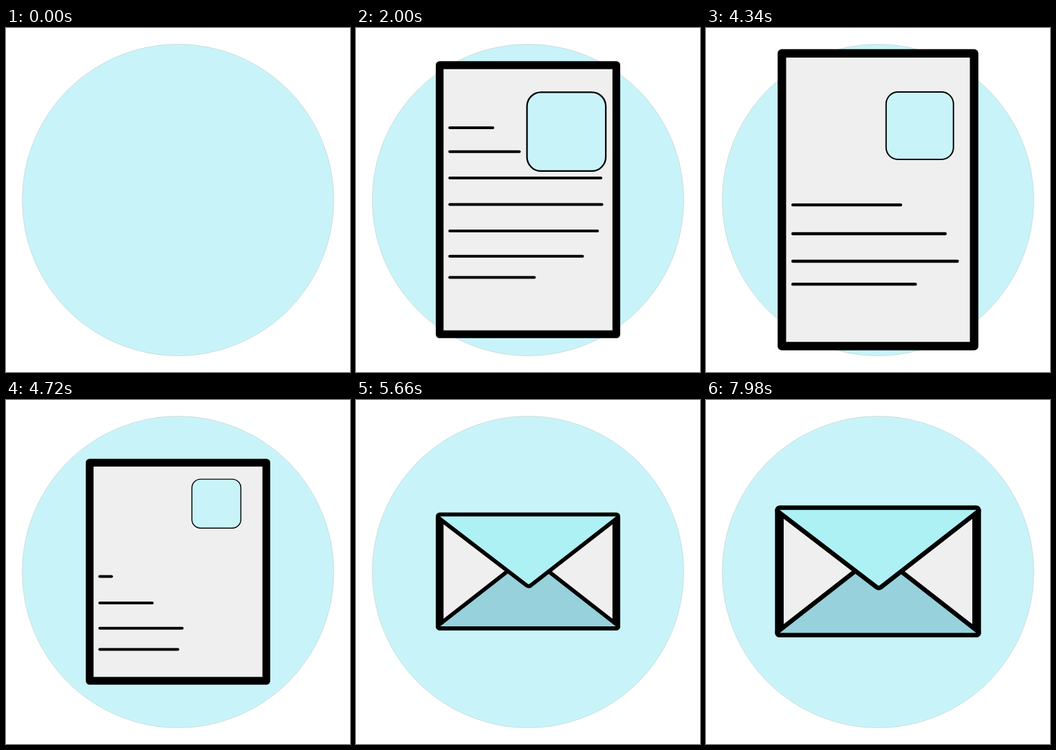
Recreate the animation shown at these times as an HTML page. Size 500x500 px, loop 8000 ms.

```html
<!DOCTYPE html>
<html lang="en">
<head>
<meta charset="utf-8">
<title>Letter to envelope</title>
<style>
  html, body { margin: 0; width: 100%; height: 100%; overflow: hidden; background: #fff; }
  svg { display: block; width: 100%; height: 100%; }
  #art { stroke: #000; stroke-linecap: round; stroke-linejoin: round; }
</style>
</head>
<body>
<svg viewBox="0 0 500 500">
  <circle cx="250" cy="250" r="226.5" fill="#c8f4f9" stroke="#b9b4b6" stroke-width=".4"/>
  <g id="art">
    <path id="page" fill="#efefef" stroke-width="11.3"/>
    <rect id="photo" x="-45" y="-45" width="90" height="90" rx="16" fill="#c8f4f9" stroke-width="1.8"/>
    <g id="lines" stroke-width="4"></g>
    <path id="bottomFlap" d="M119 -4Q118.6 0 122 0H378Q381.4 0 381 -4L253 -104Q250 -106.4 247 -104Z" fill="#96d1dc" stroke-width="5.8"/>
    <path id="topFlap" d="M119 4.3Q118.6 0 122 0H378Q381.4 0 381 4.3L254 103.2Q251 105.5 248 103.2Z" fill="#aef1f5" stroke-width="5.8"/>
  </g>
</svg>
<script>
const LOOP = 8000;
const ERASE_DELAY = 2985;
const CENTER_Y = 249.6;
const $ = id => document.getElementById(id);
const art = $('art'), page = $('page'), photo = $('photo');

// Sine ease in and out between two moments.
const ease = (t, from, to) => {
  const p = Math.min(1, Math.max(0, (t - from) / (to - from)));
  return (1 - Math.cos(Math.PI * p)) / 2;
};

const show = (el, on) => el.setAttribute('visibility', on ? 'visible' : 'hidden');

const lines = [
  { y: 145, end: 199, start: 0, dur: 530 },
  { y: 179.7, end: 237.5, start: 400, dur: 530 },
  { y: 218, end: 356, start: 775, dur: 535 },
  { y: 256.5, end: 357.5, start: 990, dur: 910 },
  { y: 295, end: 357.5, start: 1190, dur: 910 },
  { y: 331.8, end: 357.5, start: 1310, dur: 900 },
  { y: 362.5, end: 300, start: 1400, dur: 900 }
];
for (const line of lines) {
  line.el = document.createElementNS('http://www.w3.org/2000/svg', 'path');
  $('lines').append(line.el);
}

function drawPage(t) {
  const half = 195.6 - 115.9 * ease(t, 4480, 5110);
  const top = CENTER_Y - half, bottom = CENTER_Y + half;
  const drawn = ease(t, -10, 1640);
  const length = 2 * (bottom - top) + 2 * 256.8;
  page.setAttribute('d', `M121.6 ${bottom}V${top}H378.4V${bottom}H121.6`);
  page.setAttribute('stroke-dasharray', drawn < 1 ? `${drawn * length} 3000` : 'none');
}

function drawLine({ el, y, end, start, dur }, t) {
  const shown = ease(t, start, start + dur)
    - ease(t, start + ERASE_DELAY, start + ERASE_DELAY + dur);
  show(el, shown > 0);
  el.setAttribute('d', `M136.2 ${y}H${136.2 + (end - 136.2) * shown}`);
}

function drawPhoto(t) {
  const size = 1.31 * ease(t, 1680, 2040) - 0.31 * ease(t, 2040, 2300) - ease(t, 4600, 5000);
  show(photo, size > 0.001);
  photo.setAttribute('transform', `translate(305.8 150.7) scale(${Math.max(size, 0)})`);
}

function drawFlap(el, y, fold) {
  show(el, fold > 0);
  el.setAttribute('opacity', fold);
  el.setAttribute('transform', `translate(0 ${y}) scale(1 ${fold})`);
}

function render(t) {
  const pulse = 1 + 0.1 * (ease(t, 3780, 4260) - ease(t, 4260, 4620)) + 0.117 * ease(t, 7400, 8000);
  art.setAttribute('transform',
    `translate(250 ${CENTER_Y}) scale(${pulse}) translate(-250 ${-CENTER_Y})`);
  art.setAttribute('display', t < 60 ? 'none' : 'inline');
  drawPage(t);
  drawPhoto(t);
  lines.forEach(line => drawLine(line, t));
  const fold = ease(t, 5000, 5660);
  drawFlap($('bottomFlap'), 332, fold);
  drawFlap($('topFlap'), 166.3, fold);
}

function tick() {
  render(performance.now() % LOOP);
  requestAnimationFrame(tick);
}
tick();
</script>
</body>
</html>
```
